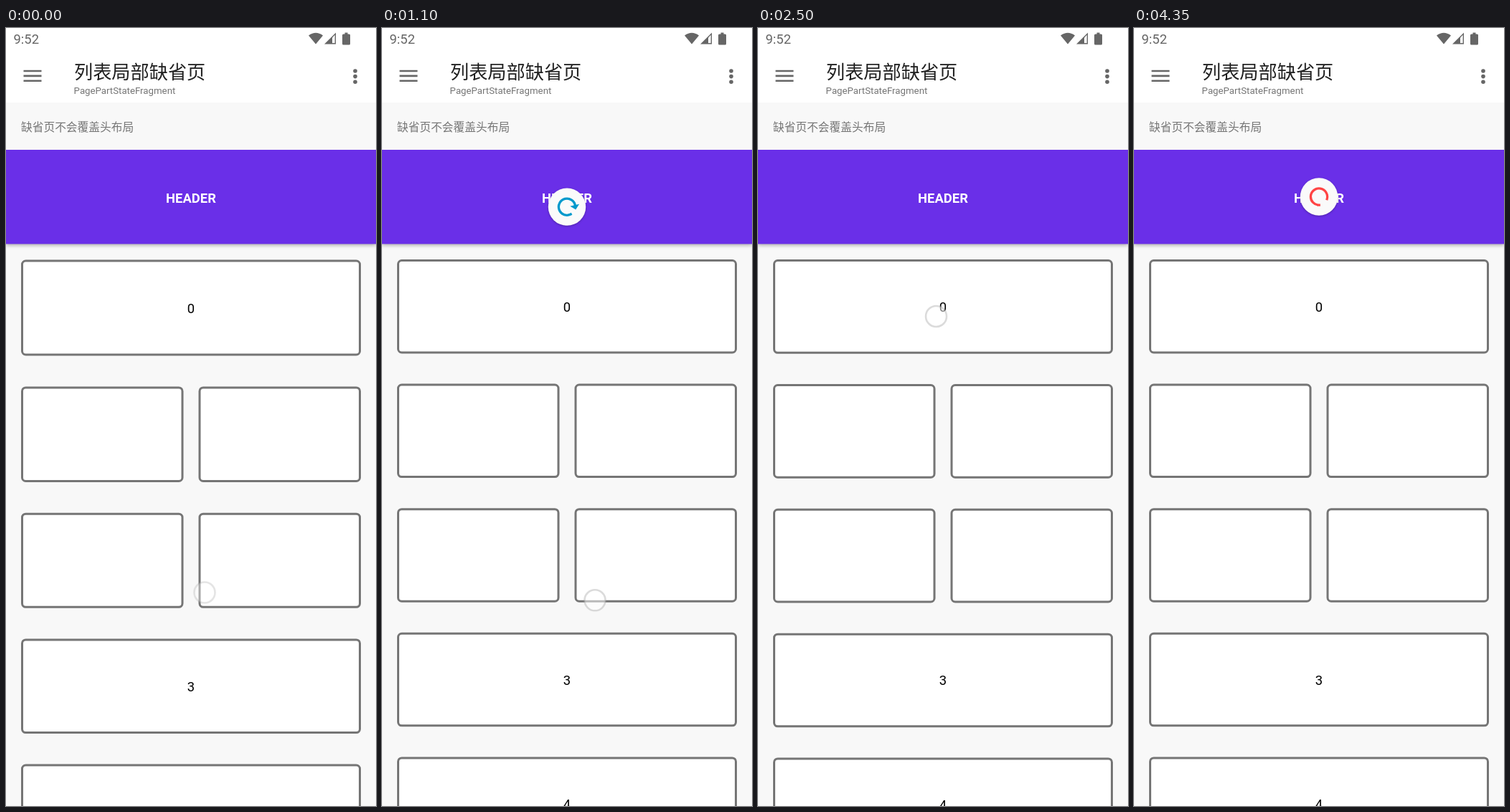
Write an HTML page that moves like this. It is 516 by 1086 pixels and loops after 4400 ms.

```html
<!DOCTYPE html>
<html lang="zh">
<head>
<meta charset="utf-8">
<style>
html, body { margin: 0; width: 100%; height: 100%; overflow: hidden; background: #f8f8f8; }
svg { display: block; width: 516px; height: 1086px; font-family: Roboto, "Noto Sans CJK SC", "Noto Sans CJK", sans-serif; }
.card rect { fill: #fff; stroke: #757575; stroke-width: 3; }
.card text, .mid { font-size: 18.4px; text-anchor: middle; }
#header { filter: drop-shadow(0 2px 2.5px rgba(0, 0, 0, .3)); }
#disc { filter: drop-shadow(0 1.5px 1.5px rgba(0, 0, 0, .28)); }
.gray { fill: #666; }
</style>
</head>
<body>
<svg viewBox="0 0 516 1086">
  <rect width="516" height="1086" fill="#f8f8f8"/>
  <g id="list"></g>
  <g id="header">
    <rect y="165" width="516" height="136.5" fill="#6a2fe8"/>
    <text class="mid" x="258" y="243.6" fill="#fff" font-weight="700">HEADER</text>
  </g>
  <g id="spinner">
    <circle id="disc" r="26.2" fill="#fafafa"/>
    <path id="arc" fill="none" stroke-width="3.3" stroke-linecap="square"/>
    <path id="arrow"/>
  </g>
  <rect width="516" height="104" fill="#fff"/>
  <rect y="104" width="516" height="66" fill="#f8f8f8"/>
  <g class="gray">
    <text x="10.5" y="22" font-size="18.4">9:52</text>
    <path d="M432 22.5L422 10.5Q432 3 442 10.5Z"/>
    <path d="M444 22.5L460 6.5V22.5Z"/>
    <path d="M455 13.4L458.6 9.8V21H455Z" fill="#fff"/>
    <path d="M472.5 6.5h4v2h2q1.500 0 1.500 1.500v12q0 1.500 -1.500 1.500h-8q-1.500 0 -1.500 -1.500v-12q0 -1.500 1.500 -1.500h2z"/>
    <path d="M24.5 58.700h25v2.600h-25zM24.500 65.600h25v2.600h-25zM24.500 72.500h25v2.600h-25z"/>
    <circle cx="487" cy="60" r="2.8"/>
    <circle cx="487" cy="67.6" r="2.8"/>
    <circle cx="487" cy="75.200" r="2.8"/>
  </g>
  <text x="95" y="70.500" font-size="26.2" fill="#212121">列表局部缺省页</text>
  <text x="94.600" y="92" font-size="13.25" fill="#757575">PagePartStateFragment</text>
  <text x="21" y="144.300" font-size="15.72" fill="#757575">缺省页不会覆盖头布局</text>
  <g id="touch">
    <circle r="14.500" fill="#fff" fill-opacity=".5" stroke="#aaa" stroke-opacity=".42" stroke-width="2.6"/>
  </g>
</svg>
<script>
const LOOP = 4400, PRESS = 280, RELEASE = 2990, FINISH = 666, TURN = 1332;
const HEIGHT = 131, RING = 11.6, TOP = 301.5, PITCH = 173.6;
const BLUE = [0, 153, 204], RED = [255, 68, 68];

// [ms, x, y] of the dragging finger
const DRAG = [
  [280, 281, 381], [400, 283, 490], [500, 285.5, 663], [550, 288, 745], [610, 291, 789],
  [720, 294, 813], [880, 295, 817], [1100, 297, 799], [1300, 297, 731], [1650, 279.5, 582],
  [2000, 262, 449], [2250, 252.5, 374], [2330, 250, 370], [2500, 248.5, 402], [2600, 252, 492],
  [2750, 264, 688], [2850, 273, 828], [2930, 279, 892], [2990, 280, 899]
];

const $ = id => document.getElementById(id);
const clamp = (v, a = 0, b = 1) => Math.min(b, Math.max(a, v));

// Smooth curve through the keys
function track(keys, t, c) {
  const n = keys.length;
  if (t <= keys[0][0]) return keys[0][c];
  if (t >= keys[n - 1][0]) return keys[n - 1][c];
  const i = keys.findIndex(k => k[0] > t) - 1;
  const slope = j => {
    const a = keys[Math.max(0, j - 1)], b = keys[Math.min(n - 1, j + 1)];
    return (b[c] - a[c]) / (b[0] - a[0]);
  };
  const [p, q] = [keys[i], keys[i + 1]], h = q[0] - p[0], u = (t - p[0]) / h, v = 1 - u;
  return v * v * (1 + 2 * u) * p[c] + u * u * (3 - 2 * u) * q[c]
    + h * u * v * (v * slope(i) - u * slope(i + 1));
}

// cubic-bezier(.4, 0, .2, 1)
function ease(x) {
  let lo = 0, hi = 1;
  for (let i = 0; i < 20; i++) {
    const s = (lo + hi) / 2, v = 1 - s;
    if (1.2 * v * v * s + .6 * v * s * s + s * s * s < x) lo = s; else hi = s;
  }
  return lo * lo * (3 - 2 * lo);
}

const cards = [];
function addCard(row, x, w, label = "") {
  $("list").insertAdjacentHTML("beforeend",
    `<g class="card"><rect x="${x}" width="${w}" rx="5"/><text x="258">${label}</text></g>`);
  const [rect, text] = $("list").lastChild.children;
  cards.push({ rect, text, y: 324.5 + row * PITCH });
}
addCard(0, 22.5, 471, "0");
for (const row of [1, 2]) {
  addCard(row, 22.5, 223.5);
  addCard(row, 270, 223.5);
}
addCard(3, 22.5, 471, "3");
addCard(4, 22.5, 471, "4");

function stretchAt(t) {
  if (t < 450) return Math.exp(-t / 110) * (1 - t / 450);
  return .1 * clamp(1 - Math.abs(t - 2500) / 80);
}

function drawList(t, scroll) {
  const k = stretchAt(t);
  const warp = y => {
    const d = y - TOP;
    return y + k * d * (.0215 - .00001 * d) - scroll;
  };
  for (const { rect, text, y } of cards) {
    const top = warp(y);
    rect.setAttribute("y", top);
    rect.setAttribute("height", warp(y + 128.5) - top);
    text.setAttribute("y", warp(y + 64.25) + 7);
  }
  $("header").setAttribute("transform", `translate(0 ${-scroll})`);
}

// Damped pull distance of the refresh header
function pullAt(t) {
  const start = t < 2300 ? 381 : 402;
  const d = t < PRESS ? 0 : Math.max(0, track(DRAG, t, 2) - start);
  return 245 * (1 - Math.exp(-d * .002515));
}

function pulledRing(pull) {
  const grow = Math.max(Math.min(1, pull / HEIGHT) - .4, 0) * 5 / 3;
  const over = clamp(pull / HEIGHT - 1, 0, 2) / 4;
  const tension = (over - over * over) * 2;
  return { a: 0, b: .8 * grow, turn: (-.25 + .4 * grow + tension * 2) / 2, arrow: grow, mix: 0 };
}

function ringAt(t, pull) {
  const ring = pulledRing(pull);
  if (t < RELEASE) return ring;
  const p = (t - RELEASE) / FINISH;
  if (p < 1) {
    ring.a = ring.b * p;
    ring.turn += (1 - ring.turn) * p;
    ring.mix = clamp((p - .75) * 4);
    return ring;
  }
  const q = (t - RELEASE - FINISH) / TURN;
  return {
    a: .8 + .8 * ease(clamp(q * 2)),
    b: .8 + .8 * ease(clamp(q * 2 - 1)),
    turn: 1 + .25 * q + .6 * q,
    arrow: 0,
    mix: 1
  };
}

function drawSpinner(t) {
  const pull = pullAt(t);
  const back = (1 - Math.cos(Math.PI * clamp((t - RELEASE) / 300))) / 2;
  const shown = pull + (HEIGHT - pull) * back;
  const y = 143.8 + Math.min(shown, shown / 2 + 26.2);
  $("spinner").setAttribute("transform", `translate(258 ${y})`);
  $("spinner").setAttribute("opacity", clamp(shown / 13));

  const { a, b, turn, arrow, mix } = ringAt(t, pull);
  const lo = Math.min(a, b) + turn, hi = Math.max(a, b) + turn;
  const point = v => `${RING * Math.cos(v * 2 * Math.PI)} ${RING * Math.sin(v * 2 * Math.PI)}`;
  const color = `rgb(${BLUE.map((c, i) => c + (RED[i] - c) * mix)})`;
  $("arc").setAttribute("d", hi - lo < .002 ? "" :
    `M${point(lo)}A${RING} ${RING} 0 ${+(hi - lo > .5)} 1 ${point(hi)}`);
  $("arc").setAttribute("stroke", color);
  $("arrow").setAttribute("fill", color);
  $("arrow").setAttribute("d",
    `M${RING - 7.17 * arrow} 0h${13.1 * arrow}l${-6.55 * arrow} ${6.55 * arrow}z`);
  $("arrow").setAttribute("transform", `rotate(${(b + turn) * 360 - 5})`);
}

function drawTouch(t) {
  const first = t < 150;
  const x = first ? 277 : track(DRAG, t, 1), y = first ? 788 : track(DRAG, t, 2);
  const alpha = first ? .75 * clamp(1 - t / 100)
    : t < PRESS ? 0 : clamp(1 - (t - RELEASE) / 80);
  $("touch").setAttribute("transform", `translate(${x} ${y})`);
  $("touch").setAttribute("opacity", alpha);
}

function frame() {
  const t = performance.now() % LOOP;
  const scroll = t > 2200 && t < 2500 ? Math.max(0, 381 - track(DRAG, t, 2)) : 0;
  drawList(t, scroll);
  drawSpinner(t);
  drawTouch(t);
  requestAnimationFrame(frame);
}
frame();
</script>
</body>
</html>
```
